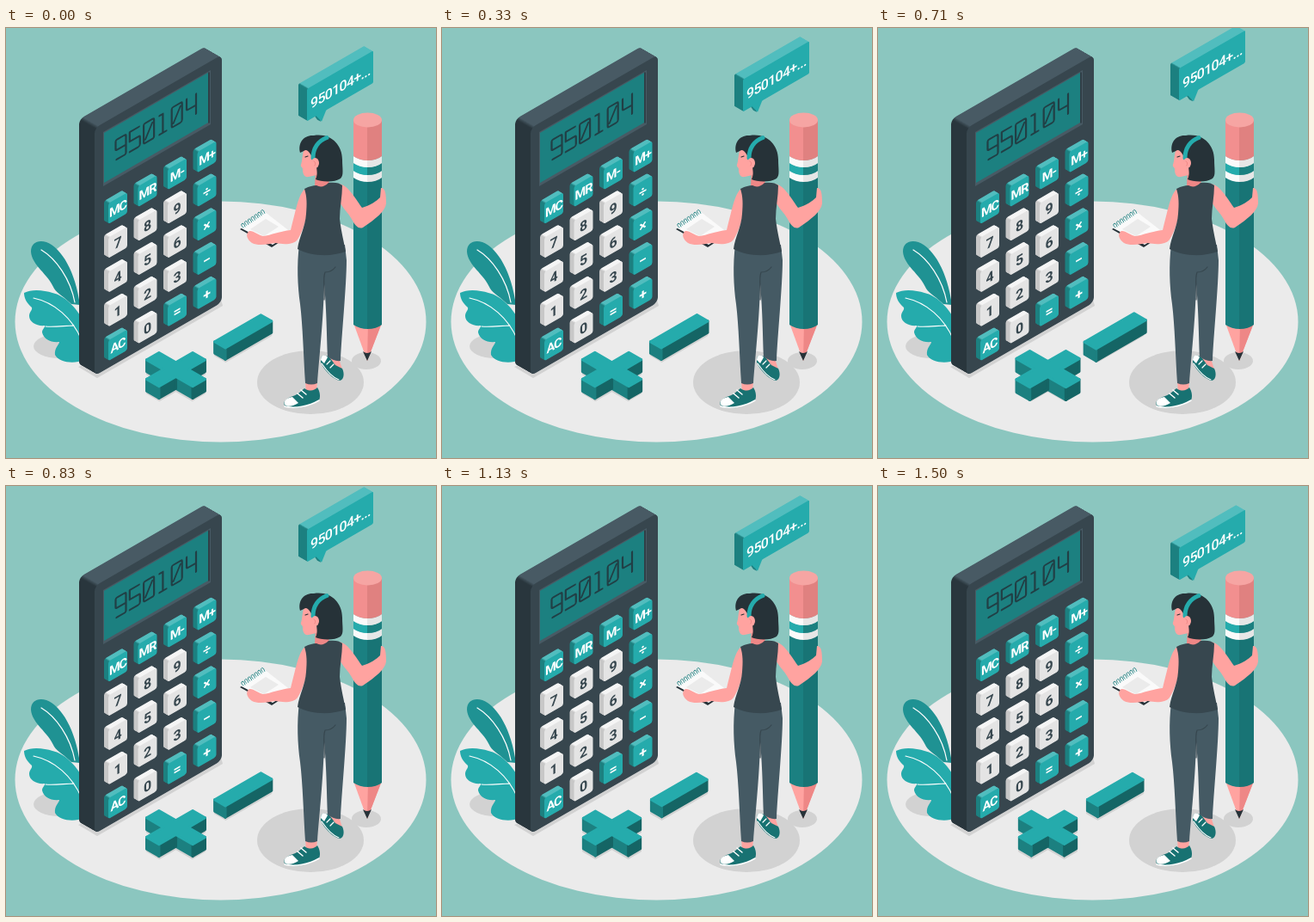
An HTML page with a canvas that plays this animation: 500 by 500 pixels, repeating every 1.54 s.

```html
<!DOCTYPE html>
<html lang="en">
<head>
<meta charset="utf-8">
<title>Calculator</title>
<style>
  html, body { margin: 0; width: 100%; height: 100%; overflow: hidden; background: #8bc6bf; }
  canvas { display: block; width: 100vw; height: 100vh; }
</style>
</head>
<body>
<canvas id="stage" width="500" height="500"></canvas>
<script>
const ctx = document.getElementById('stage').getContext('2d');
const LOOP = 1540, CYCLE = 1500, LEAD = 33;
const SLOPE = 0.577;
const TEAL = '#25abac', DEEP = '#1c8080', SHADE = '#156565', INK = '#263238';
const SLATE = '#37474f', STEEL = '#455a64', SKIN = '#ffa3a0', ROSE = '#ee8786';
const SHADOW = '#d2d2d2', PALE = '#ebebeb';

function shape(d, fill) {
  ctx.fillStyle = fill;
  ctx.fill(new Path2D(d));
}

function line(d, color, width) {
  ctx.strokeStyle = color;
  ctx.lineWidth = width;
  ctx.lineCap = ctx.lineJoin = 'round';
  ctx.stroke(new Path2D(d));
}

function oval(x, y, rx, ry, fill) {
  ctx.fillStyle = fill;
  ctx.beginPath();
  ctx.ellipse(x, y, rx, ry, 0, 0, Math.PI * 2);
  ctx.fill();
}

// Runs draw() on a wall plane that rises to the right.
function onWall(x, y, draw) {
  ctx.save();
  ctx.transform(1, -SLOPE, 0, 1, x, y);
  draw();
  ctx.restore();
}

// Rounded wall slab with visible left side and top edge.
function slab(x, y, w, h, r, depth, [front, side, top]) {
  for (let i = depth; i >= 0; i -= 0.5) {
    onWall(x - i, y - i * SLOPE, () => {
      const edge = ctx.createLinearGradient(0, 0, r + 2, 0);
      edge.addColorStop(0.25, side);
      edge.addColorStop(0.6, top);
      ctx.fillStyle = i ? edge : front;
      ctx.beginPath();
      ctx.roundRect(0, 0, w, h, r);
      ctx.fill();
    });
  }
}

function wallText(text, x, y, font, color, align, spacing = 0) {
  onWall(x, y, () => {
    ctx.font = font + ' Roboto, sans-serif';
    ctx.letterSpacing = spacing + 'px';
    ctx.fillStyle = color;
    ctx.textAlign = align;
    ctx.textBaseline = 'alphabetic';
    ctx.fillText(text, 0, 0);
  });
}

// The wide round stroke softens the corners.
function polygon(points, fill) {
  ctx.beginPath();
  points.forEach(p => ctx.lineTo(p[0], p[1]));
  ctx.closePath();
  ctx.fillStyle = ctx.strokeStyle = fill;
  ctx.lineWidth = 3;
  ctx.lineJoin = 'round';
  ctx.fill();
  ctx.stroke();
}

// Block lying on the floor; outline is clockwise in floor units.
function block(cx, cy, outline, height, scale) {
  const top = outline.map(([a, b]) => [(a + b) * 0.866, (a - b) * 0.5 - height / 2]);
  const drop = ([x, y]) => [x, y + height];
  ctx.save();
  ctx.translate(cx, cy);
  ctx.save();
  ctx.translate(0, height + 2.5);
  polygon(top, SHADOW);
  ctx.restore();
  ctx.scale(scale, scale);
  top.map((p, i) => [p, top[(i + 1) % top.length]])
    .filter(([p, q]) => q[0] < p[0])
    .sort((e, f) => e[0][1] + e[1][1] - f[0][1] - f[1][1])
    .forEach(([p, q]) => polygon([p, q, drop(q), drop(p)], q[1] > p[1] ? SHADE : DEEP));
  polygon(top, TEAL);
  ctx.restore();
}

function plusOutline(l, w) {
  return [[-l, -w], [-l, w], [-w, w], [-w, l], [w, l], [w, w],
          [l, w], [l, -w], [w, -w], [w, -l], [-w, -l], [-w, -w]];
}

function barOutline(l, w) {
  return [[-w, -l], [-w, l], [w, l], [w, -l]];
}

function drawPlant() {
  oval(62, 370, 30, 14, SHADOW);
  shape('M29 260C29 250 37 246 47 249C65 256 81 284 86 322L76 321C68 313 60 309 56 303C49 286 30 276 29 260Z', '#1f9293');
  line('M41 258C58 268 75 292 80 319', '#fff', 1.2);
  shape('M21 308C30 303 45 305 54 308C68 311 82 325 90 341V386C80 391 61 389 57 380C56 372 62 368 62 365C52 366 44 362 42 354C42 350 46 348 45 346C36 347 27 342 27 335C27 330 31 328 30 325C24 320 21 314 21 308Z', TEAL);
  line('M32 314C56 319 77 337 88 363M46 347C57 348 69 346 79 346', '#fff', 1.1);
}

const GLYPHS = {
  9: 'M12 12H2Q0 12 0 10V2Q0 0 2 0H10Q12 0 12 2V21Q12 23 10 23H1',
  5: 'M11 0H0V11H10Q12 11 12 13V21Q12 23 10 23H0',
  0: 'M2 0H10Q12 0 12 2V21Q12 23 10 23H2Q0 23 0 21V2Q0 0 2 0ZM10 4L2 19',
  1: 'M2 1H6V23M2 23H10',
  4: 'M1 0V11Q1 13 3 13H12M12 0V23'
};

const KEYS = [
  ['MC', 'MR', 'M-', 'M+'],
  ['7', '8', '9', '÷'],
  ['4', '5', '6', '×'],
  ['1', '2', '3', '−'],
  ['AC', '0', '=', '+']
];

function drawCalculator() {
  shape('M84 394L106 407L252 323L250 316Z', SHADOW);
  slab(103, 116.5, 148, 288, 6, 18, ['#37464e', '#29363d', '#485a64']);
  shape('M113 121L238 49V112L113 184Z', '#485a64');
  shape('M114 122L235 52V110L114 180Z', DEEP);
  line('M236 52V110', '#29363d', 1.5);
  [...'950104'].forEach((digit, i) => {
    const x = i * 16.3;
    onWall(127.5 + x, 130.5 - x * SLOPE, () => line(GLYPHS[digit], '#213f45', 2.2));
  });
  KEYS.forEach((row, r) => row.forEach((label, c) => {
    const x = 119 + c * 34.5, y = 204 + r * 39.8 - c * 19.9;
    const white = /\d/.test(label);
    slab(x, y, 22, 24, 2.5, 5,
      white ? ['#e4e4e4', '#c7c7c7', '#f5f5f5'] : [TEAL, DEEP, '#51bdbe']);
    const word = label.length > 1;
    const size = word ? 14.5 : 16;
    wallText(label, x + 11, y + 12 + size * 0.36 - 11 * SLOPE,
      `bold ${size}px`, white ? SLATE : '#fff', 'center', word ? -1 : 0);
  }));
}

function drawPencil() {
  oval(419, 387, 17, 10, SHADOW);
  shape('M404 343L420 387L437 343Z', SKIN);
  shape('M421 343L420 387L437 343Z', ROSE);
  shape('M415 376Q420 380 425 376L420 387Z', INK);
  const band = (top, bottom, left, right) => {
    shape(`M404 ${top}Q411 ${top + 5} 421 ${top + 5}V${bottom + 5}Q411 ${bottom + 5} 404 ${bottom}Z`, left);
    shape(`M420 ${top + 5}Q431 ${top + 5} 437 ${top}V${bottom}Q431 ${bottom + 5} 420 ${bottom + 5}Z`, right);
  };
  band(173, 345, '#1b8081', '#187475');
  band(166, 174, '#fafafa', '#e6e6e6');
  band(157, 166, TEAL, DEEP);
  band(149, 157, '#fafafa', '#e6e6e6');
  band(106, 149, '#f28f8f', '#e08180');
  oval(420.5, 107, 16.5, 8.5, '#f6a5a3');
}

function drawNotebook() {
  shape('M272 234L309 255L332 240L300 217Z', INK);
  shape('M272 232L310 252L332 238L300 213Z', '#fafafa');
  shape('M284 234L302 222L317 231L300 242Z', PALE);
  for (let i = 0; i < 7; i++) {
    const x = 276 + i * 3.8, y = 232 - i * 2.6;
    line(`M${x} ${y}q-4 -3 -1 -5q2 0 3 4`, DEEP, 0.9);
  }
}

function drawWoman() {
  drawNotebook();
  // shoes
  shape('M374 379L386 381L391 397L382 396Z', SKIN);
  shape('M366 385C366 380 372 379 377 384L383 392L391 396C394 402 393 410 387 410C379 407 370 398 366 389Z', '#187272');
  shape('M366 386C366 380 371 379 374 383L370 390Z', '#fff');
  line('M367 390C373 399 379 406 387 409M377 387L373 391M381 391L377 395', '#fff', 1.2);
  shape('M348 410H362L361 423L349 424Z', SKIN);
  shape('M347 419C353 423 358 422 362 418C365 422 366 429 364 433C351 441 333 444 325 440C321 436 324 432 331 429C339 427 343 422 347 419Z', '#187272');
  shape('M324 438C322 433 327 430 333 429L340 436C334 440 327 441 324 438Z', '#fff');
  line('M324 440C336 443 352 440 364 433M339 425L345 430M343 421L349 426', '#fff', 1.5);
  // trousers
  shape('M341 252C338 275 339 300 342 321C345 345 346 382 348 413Q355 416 362 413C364 385 369 340 370 298C373 330 373 362 374 382Q381 388 389 387C390 360 396 300 396 270L394 252Z', STEEL);
  line('M383 278C380 282 375 284 371 284C368 292 371 302 370 316', SLATE, 1.2);
  // arms
  shape('M350 186C341 189 338 208 331 235C319 236 308 241 299 242C294 241 287 235 283 236C278 239 280 246 286 250C294 254 305 251 314 250C323 252 335 252 339 246C345 237 351 219 353 202Z', SKIN);
  shape('M386 181C397 182 404 195 414 209C424 206 431 201 435 197L436 186C441 186 442 192 442 204C441 213 430 222 415 232C410 234 406 230 403 224C398 214 389 208 386 197Z', SKIN);
  // neck and top
  shape('M360 165L375 168L376 187Q366 190 359 183Z', ROSE);
  shape('M347 187C353 184 357 183 361 183Q368 187 375 180C382 179 388 180 391 183C391 196 388 209 388 222C390 238 393 249 395 260C378 266 356 266 339 257C341 242 348 232 349 216C350 205 350 196 347 187Z', SLATE);
  // head
  shape('M347 140C344 148 345 153 343 159C342 161 345 162 345 164C345 170 347 174 352 173L361 171L371 160L368 136Z', SKIN);
  shape('M342 145C339 134 346 124 358 125C378 122 391 136 391 153C391 164 393 171 389 175C382 180 366 179 360 176C363 170 361 165 361 160L356 155C357 149 352 143 349 142C347 142 345 144 342 145Z', INK);
  line('M357 151C357 140 363 131 373 127.5', TEAL, 5);
  oval(359.5, 157, 4.5, 6, SKIN);
  line('M358 155Q361 156 359 160', ROSE, 1);
  line('M348 150L351 149', INK, 1.2);
}

function drawBubble(lift) {
  ctx.save();
  ctx.translate(0, -lift);
  shape('M357 101L363 98L366 110L362 108Z', DEEP);
  slab(350, 72, 77, 37.5, 1.5, 10, [TEAL, DEEP, '#51bdbe']);
  shape('M360 103L373 95L367 110Z', TEAL);
  wallText('950104+...', 354, 95.5, '500 16px', '#fff', 'left', -0.7);
  ctx.restore();
}

// Two beats, then rest.
function beat(p) {
  const ramp = (from, to) => Math.min(1, Math.max(0, (p - from) / (to - from)));
  return 1 + 0.1 * (ramp(0, 0.1) - ramp(0.1, 0.3) + ramp(0.4, 0.5) - ramp(0.5, 0.6));
}

function render(now) {
  const p = Math.min(1, (now % LOOP + LEAD) / CYCLE);
  const scale = beat(p);
  const lift = 25 * (1 - Math.abs(1 - 2 * p));
  ctx.fillStyle = '#8bc6bf';
  ctx.fillRect(0, 0, 500, 500);
  oval(249.5, 341.5, 239, 140, PALE);
  drawPlant();
  drawCalculator();
  block(275.7, 359.5, barOutline(30.3, 7), 13, scale);
  block(197.5, 404, plusOutline(30.2, 8.1), 13.5, scale);
  oval(354, 412, 62, 37, SHADOW);
  drawPencil();
  drawWoman();
  drawBubble(lift);
  requestAnimationFrame(render);
}
requestAnimationFrame(render);
</script>
</body>
</html>
```
